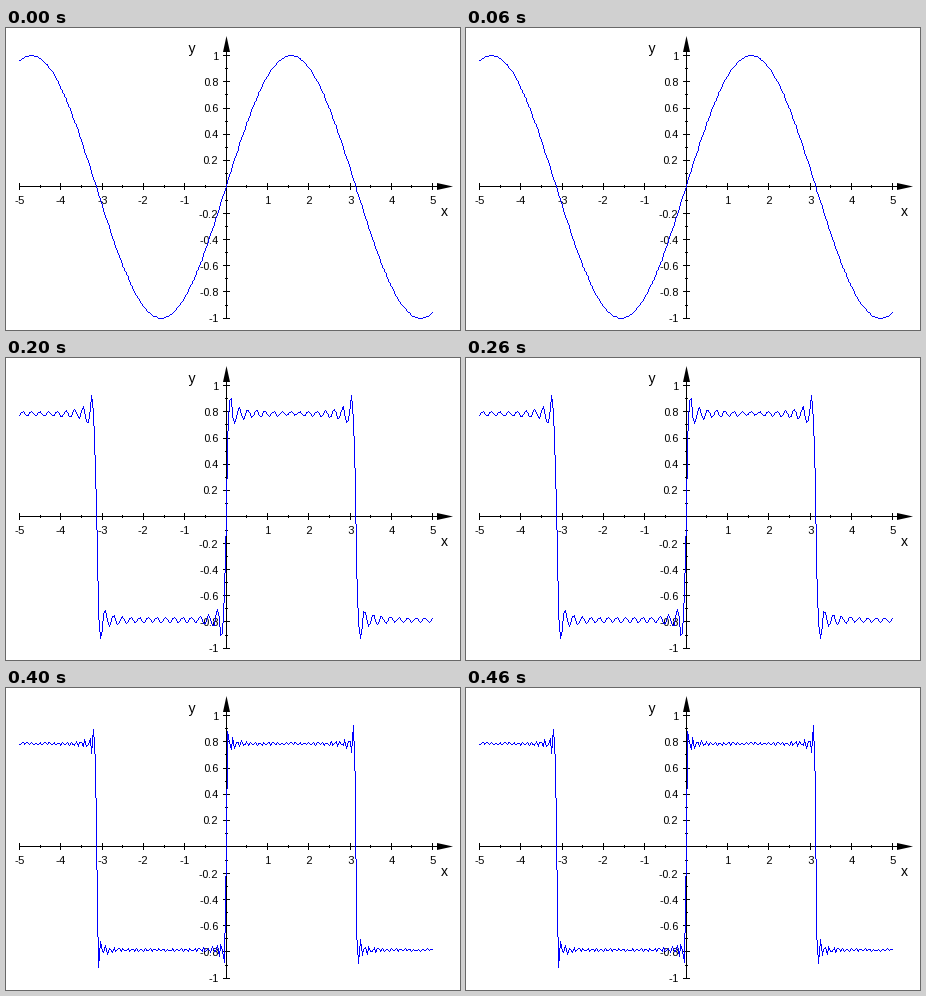
These frames come from a looping animation (454x302 px, 0.5 s). A matplotlib script:

```python
import numpy as np
import matplotlib.pyplot as plt
from matplotlib.animation import FuncAnimation

W, H, DPI = 454, 302, 100
PX = 72 / DPI                 # one pixel in points
X0, Y0 = 219.6, 158.4         # origin of the plot, in pixel indices
SX, SY = 41.3, 131.3          # pixels per unit
FRAMES, INTERVAL = 5, 100
BLUE = (0, 0, 1, 1)

plt.rcParams.update({
    "font.family": "Liberation Sans",
    "text.hinting": "force_autohint",
    "text.hinting_factor": 1,
})

fig = plt.figure(figsize=(W / DPI, H / DPI), dpi=DPI, facecolor="white")
ax = fig.add_axes([0, 0, 1, 1])


def to_pixel(x, y):
    """Nearest pixel indices (column, row) of a point of the plot."""
    col = np.rint(X0 + SX * np.asarray(x)).astype(int)
    row = np.rint(Y0 - SY * np.asarray(y)).astype(int)
    return col, row


def line(xs, ys):
    ax.plot(xs, ys, color="black", lw=PX, solid_capstyle="butt", snap=False)


def label(x, y, text, size=11, ha="center"):
    ax.text(x, y, text, fontsize=size * PX, ha=ha, va="baseline")


def arrow(points):
    ax.fill(*zip(*points), color="black", lw=0, snap=False)


def draw_axes():
    cx, cy = (v + 0.5 for v in to_pixel(0, 0))
    line([13, 440], [cy, cy])
    line([cx, cx], [14, 291])
    arrow([(431, cy - 3.5), (447, cy), (431, cy + 3.5)])
    arrow([(cx - 3.5, 24), (cx, 8), (cx + 3.5, 24)])

    for k in range(-10, 11):
        major = k % 2 == 0
        reach = 3.5 if major else 1.5
        px, py = (v + 0.5 for v in to_pixel(k / 2, k / 10))
        line([px, px], [cy - reach, cy + reach])
        line([cx - reach, cx + reach], [py, py])
        if major and k:
            label(px, 176, f"{k // 2}")
            label(212.5, py + 4, f"{k / 10:g}", ha="right")

    label(438, 188, "x", 14)
    label(185.5, 25, "y", 14)


def square_wave(x, terms):
    """Partial Fourier sum of a square wave of height pi/4."""
    odd = 2 * np.arange(terms)[:, None] + 1
    return (np.sin(odd * x) / odd).sum(axis=0)


def crisp_polyline(cols, rows):
    """Image of a one pixel wide polyline without smoothing."""
    image = np.zeros((H, W, 4))
    for c0, r0, c1, r1 in zip(cols, rows, cols[1:], rows[1:]):
        t = np.linspace(0, 1, max(abs(c1 - c0), abs(r1 - r0)) + 1)
        c = np.rint(c0 + (c1 - c0) * t).astype(int)
        r = np.rint(r0 + (r1 - r0) * t).astype(int)
        image[r, c] = BLUE
    return image


draw_axes()
xs = np.linspace(-5, 5, 241)
curve = ax.imshow(np.zeros((H, W, 4)), extent=(0, W, H, 0), aspect="auto",
                  interpolation="nearest", zorder=5)
ax.set_xlim(0, W)
ax.set_ylim(H, 0)
ax.axis("off")


def update(i):
    ys = square_wave(xs, 1 + 7 * i)
    curve.set_data(crisp_polyline(*to_pixel(xs, ys)))
    return curve,


anim = FuncAnimation(fig, update, frames=FRAMES, interval=INTERVAL,
                     repeat=True, repeat_delay=0)
plt.show()
```
